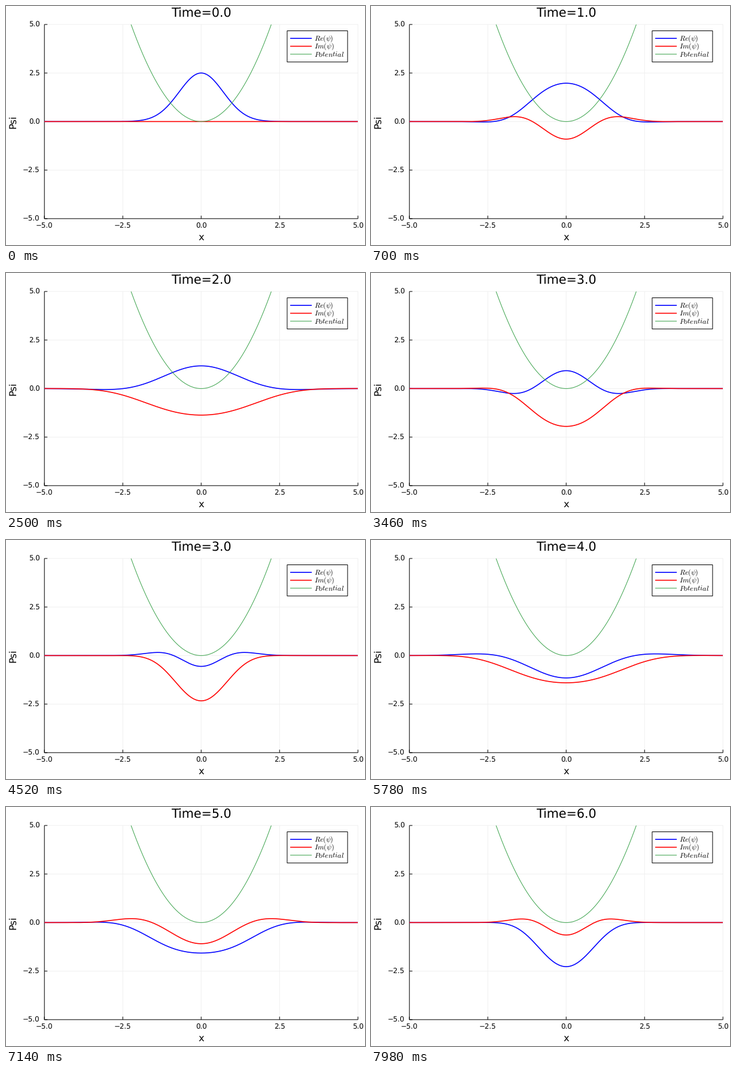
These frames come from a looping animation (600 by 400 pixels, 8 s). A matplotlib script:

```python
import matplotlib.pyplot as plt
import numpy as np
from matplotlib.animation import FuncAnimation
from matplotlib.lines import Line2D
from matplotlib.patches import Rectangle

W, H = 600, 400
PX = 0.72                      # points per pixel at 100 dpi
LEFT, RIGHT, TOP, BOTTOM = 64.2, 588.2, 30.9, 355.9
MID_X, MID_Y = (LEFT + RIGHT) / 2, (TOP + BOTTOM) / 2
FRAMES, INTERVAL, DT = 400, 20, 0.015
BLUE, RED, GREEN = "#0000ff", "#ff0000", "#3ea44e"
TICKS = (-5, -2.5, 0, 2.5, 5)

plt.rcParams.update({
    "font.family": "DejaVu Sans",
    "mathtext.fontset": "cm",
    "text.hinting": "none",
})

fig = plt.figure(figsize=(W / 100, H / 100), dpi=100, facecolor="white")
ax = fig.add_axes([LEFT / W, 1 - BOTTOM / H,
                   (RIGHT - LEFT) / W, (BOTTOM - TOP) / H])
ax.set(xlim=(-5, 5), ylim=(-5, 5))
ax.axis("off")


def label(x, y, text, size, **kw):
    kw = {"ha": "center", "va": "baseline", **kw}
    return fig.text(x / W, 1 - y / H, text, fontsize=size * PX, **kw)


def segment(xs, ys, color="black", width=1, **kw):
    line = Line2D(np.array(xs) / W, 1 - np.array(ys) / H, color=color,
                  lw=width * PX, transform=fig.transFigure, snap=False,
                  solid_capstyle="butt", solid_joinstyle="miter", **kw)
    fig.add_artist(line)


def curve(color, width, ys=()):
    line, = ax.plot(x[:len(ys)], ys, color=color, lw=width * PX, snap=False,
                    solid_capstyle="butt")
    return line


def psi(t):
    """Squeezed Gaussian breathing in a unit-frequency harmonic well."""
    c, s = np.cos(t), np.sin(t)
    q = c + 2j * s
    phase = np.arctan2(2 * s, c) % (2 * np.pi)
    amp = 2.5 / np.sqrt(abs(q)) * np.exp(-0.5j * phase)
    return amp * np.exp(-x**2 / 2 * (2 * c + 1j * s) / q)


# Grid, ticks and axis lines
for v in TICKS:
    px = MID_X + v / 10 * (RIGHT - LEFT)
    py = MID_Y - v / 10 * (BOTTOM - TOP)
    segment([px, px], [TOP, BOTTOM], "#f0f0f0", zorder=-2)
    segment([LEFT, RIGHT], [py, py], "#f0f0f0", zorder=-2)
    segment([px, px], [BOTTOM, BOTTOM - 5], zorder=-1)
    segment([LEFT, LEFT + 5], [py, py], zorder=-1)
    name = f"{v:.1f}".replace("-", "\u2212")
    label(px, 371.9, name, 11.8)
    label(56.7, py + 4.4, name, 11.8, ha="right")
segment([LEFT, LEFT, RIGHT], [TOP, BOTTOM, BOTTOM], zorder=-1)

label(MID_X, 392.4, "x", 16.3)
label(16, MID_Y, "Psi", 16.3, rotation=90, rotation_mode="anchor")
title = label(MID_X, 18.5, "", 20.7)

# Curves
x = np.linspace(-5, 5, 401)
real = curve(BLUE, 1.6)
imag = curve(RED, 1.6)
curve(GREEN, 1, x**2)

# Legend
fig.add_artist(Rectangle((469.9 / W, 1 - 93.7 / H), 101 / W, 52.2 / H,
                         fc="white", ec="black", lw=PX, snap=False,
                         transform=fig.transFigure, zorder=3))
entries = ((r"$Re(\psi)$", BLUE, 1.6), (r"$Im(\psi)$", RED, 1.6),
           (r"$Potential$", GREEN, 1))
for i, (name, color, width) in enumerate(entries):
    y = 54.2 + 13.2 * i
    segment([475, 511], [y, y], color, width, zorder=4)
    label(515.3, y + 3.9, name, 11.9, ha="left", zorder=4)


def update(n):
    t = n * DT
    wave = psi(t)
    real.set_data(x, wave.real)
    imag.set_data(x, wave.imag)
    title.set_text(f"Time={round(t):.1f}")
    return real, imag, title


anim = FuncAnimation(fig, update, frames=FRAMES, interval=INTERVAL,
                     repeat=True, repeat_delay=0)
plt.show()
```
